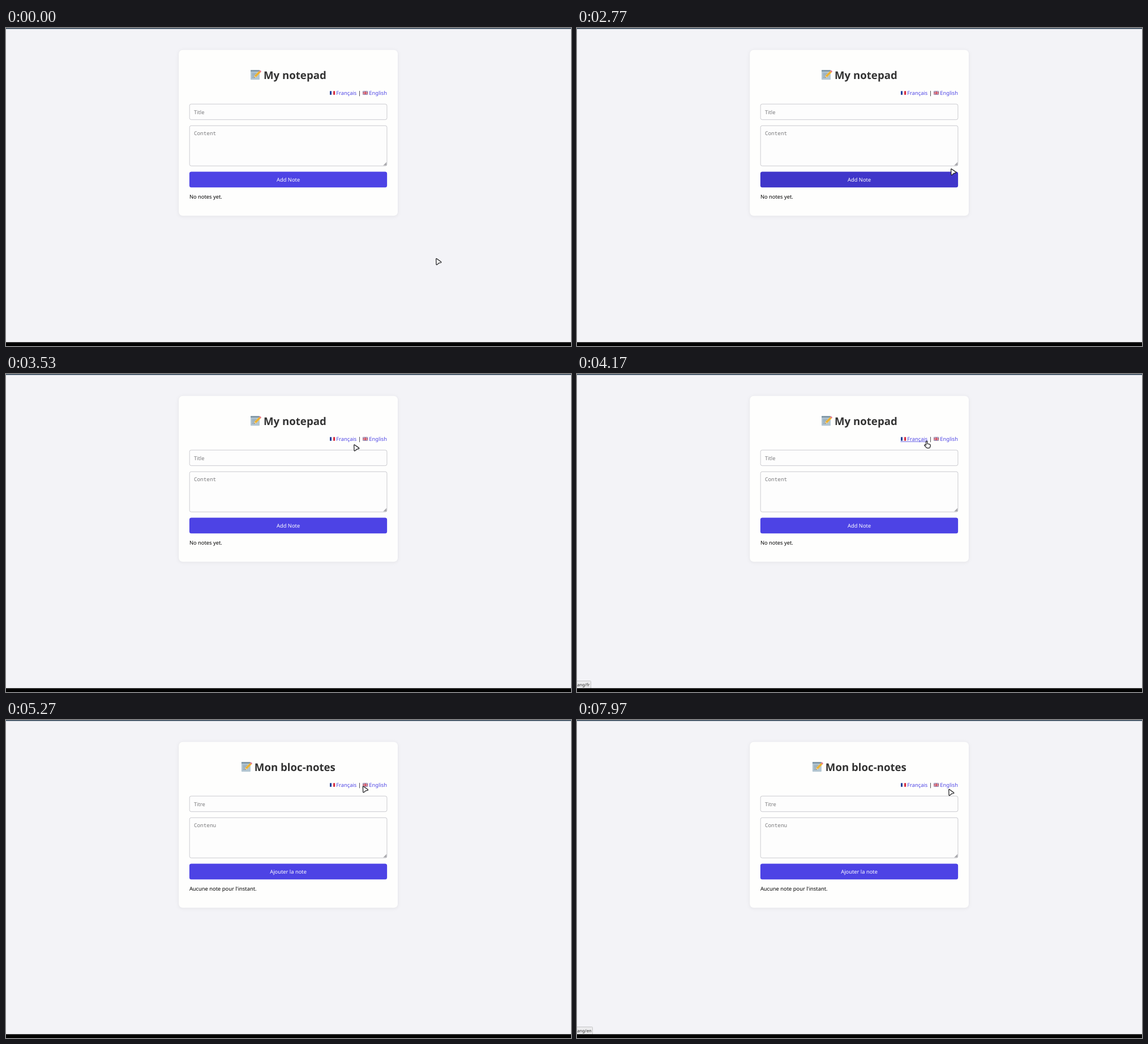
An HTML page for the animation above (8 s loop, 998 by 561 pixels).

```html
<!DOCTYPE html>
<html lang="en">
<head>
<meta charset="utf-8">
<title>Notepad</title>
<style>
  html, body { margin: 0; width: 100%; height: 100%; overflow: hidden; background: #f3f3f7; }
  svg { display: block; width: 998px; height: 561px; }
  text { font: 9.33px "Noto Sans", sans-serif; text-rendering: geometricPrecision; white-space: pre; }
  .title { font-size: 18.66px; font-weight: 700; fill: #333; }
  .hint { fill: #7b7b7d; }
  .mono { font-family: "Noto Sans Mono", monospace; }
  .field { fill: #fdfdfd; stroke: #cbcbd0; }
  .link text { fill: #4f46e5; }
  .link line { stroke: #4f46e5; stroke-width: .8; visibility: hidden; }
  .link.on line { visibility: visible; }
  .status { font-size: 7.62px; fill: #333; }
  .card { filter: drop-shadow(0 1px 3px rgba(0, 0, 0, .07)); }
  .cursor { fill: #fff; stroke: #1c1c1f; stroke-width: 1.25; stroke-linejoin: round; }
</style>
</head>
<body>
<svg viewBox="0 0 998 561">
  <rect width="998" height="561" fill="#f3f3f7"/>
  <rect width="998" height="1.6" fill="#2b4054"/>
  <rect class="card" x="305.3" y="38.8" width="386.7" height="292.4" rx="7" fill="#fefefd"/>

  <g id="memo">
    <rect x=".6" y="1" width="16" height="17.2" rx="1" fill="#b3c6d2"/>
    <rect x=".6" y="1" width="16" height="3" rx="1" fill="#8299a8"/>
    <path d="M3 7h8M3 9.5h6.500M3 12h4.500M3 14.500h3" stroke="#7f96a5" stroke-width=".9"/>
    <path d="M6.600 14.800l1-3.700 8-8.200 2.700 2.600-8 8.300z" fill="#f5bd35"/>
    <path d="M8.800 12.400l8-8.200" stroke="#d9942a" stroke-width=".9"/>
    <path d="M6.600 14.800l1-3.700 2.700 2.700z" fill="#ecd2a6"/>
    <path d="M6.600 14.800l.4-1.500 1.100 1.100z" fill="#3c3c3c"/>
    <path d="M15.600 2.900l1-1q.8-.6 1.600.1l1 1q.6.800 0 1.600l-.9.900z" fill="#e8788c"/>
  </g>
  <text class="title" id="title" y="89.700"></text>

  <g class="link" id="fr">
    <g transform="translate(572 111.300)">
      <rect width="3.200" height="6.500" fill="#21409a"/>
      <rect x="3.100" width="3" height="6.500" fill="#f3f3f3"/>
      <rect x="6.100" width="3.100" height="6.500" fill="#d8283a"/>
    </g>
    <text x="583.200" y="117.900">Français</text>
    <line x1="571.500" x2="619.600" y1="119.400" y2="119.400"/>
  </g>
  <text x="622" y="117.900">|</text>
  <g class="link" id="en">
    <g transform="translate(630 111.300)">
      <rect width="9.200" height="6.500" fill="#2c4a97"/>
      <path d="M0 0l9.200 6.500M9.200 0L0 6.500" stroke="#f3f3f3" stroke-width="1.400"/>
      <path d="M0 0l9.200 6.500M9.200 0L0 6.500" stroke="#d02c40" stroke-width=".5"/>
      <path d="M4.600 0v6.500M0 3.250h9.200" stroke="#f3f3f3" stroke-width="2.300"/>
      <path d="M4.600 0v6.500M0 3.250h9.200" stroke="#d02c40" stroke-width="1.300"/>
    </g>
    <text x="641.300" y="117.900">English</text>
    <line x1="629.500" x2="673" y1="119.400" y2="119.400"/>
  </g>

  <rect class="field" x="324.200" y="134.200" width="348.700" height="27.500" rx="3"/>
  <text class="hint" id="name" x="331.900" y="151.700"></text>
  <rect class="field" x="324.200" y="172.300" width="348.700" height="71" rx="3"/>
  <text class="hint mono" id="body" x="331.900" y="189"></text>
  <path d="M672.200 236.500v6h-6z" fill="#a9a9ad"/>
  <rect id="button" x="323.900" y="253.400" width="349.200" height="27.900" rx="3.500"/>
  <text id="add" x="498.600" y="270.900" text-anchor="middle" fill="#fff"></text>
  <text id="empty" x="323.900" y="300.600"></text>

  <g id="status">
    <path id="panel" fill="#ececee" stroke="#c4c4c6"/>
    <text class="status" id="url" y="550.700"></text>
  </g>
  <rect y="554.300" width="998" height="6.700"/>

  <path class="cursor" id="arrow" d="M.7 1.500Q.8.300 1.800 1L9.400 6.400Q10.300 7.600 9 8L5.600 8.700 2.600 11.400Q1.100 12.200 1 10.600Z"/>
  <path class="cursor" id="hand" d="M3.500 7.500V1.600a1.200 1.200 0 0 1 2.400 0V5L9.800 5.900Q11.400 6.400 11.300 8L10.600 11Q10.300 12.500 9 12.500H5.500Q4.600 12.500 4 11.700L1 8.400Q.3 7.400 1.300 6.900 2.200 6.600 3.500 7.500Z"/>
</svg>
<script>
const LOOP = 8000;
const $ = id => document.getElementById(id);

const words = {
  en: { title: "My notepad", name: "Title", body: "Content", add: "Add Note",
        empty: "No notes yet.", memoX: 431.4 },
  fr: { title: "Mon bloc-notes", name: "Titre", body: "Contenu", add: "Ajouter la note",
        empty: "Aucune note pour l'instant.", memoX: 415.3 }
};

// [ms, x, y] of the pointer's top left corner
const path = [
  [2330, 759, 406], [2430, 760, 411], [2530, 740, 378], [2650, 694, 302],
  [2770, 660, 248], [2950, 642, 199], [3130, 632, 161], [3330, 621, 138],
  [3530, 614, 124], [3700, 613, 120], [3970, 613, 117], [4170, 613, 118],
  [4900, 613, 118], [5100, 616, 117], [5300, 632, 116], [5500, 646, 116],
  [5750, 653, 116], [6000, 655, 117], [7630, 655, 117], [7760, 655, 119],
  [7880, 656, 123.5], [7970, 656, 121.5]
];

// Each table holds [start ms, value]
const pages = [[0, "en"], [4970, "fr"]];
const hovers = [[0, ""], [2670, "button"], [2800, ""], [3730, "fr"], [5200, ""], [5310, "en"], [7800, ""]];
const statuses = [[0, null], [3760, ["ang/fr", 25]], [4630, ["lhost...", 110]], [4970, ["ang/fr", 25]],
  [5230, null], [5450, ["ang/en", 28]]];

const at = (table, t) => table.findLast(row => row[0] <= t)[1];

function pointer(t) {
  const i = path.findIndex(p => p[0] > t);
  if (i === 0) return path[0].slice(1);
  if (i < 0) return path.at(-1).slice(1);
  const a = path[i - 1], b = path[i], k = (t - a[0]) / (b[0] - a[0]);
  return [a[1] + (b[1] - a[1]) * k, a[2] + (b[2] - a[2]) * k];
}

const show = (el, on) => el.setAttribute("visibility", on ? "visible" : "hidden");

function draw(t) {
  const page = words[at(pages, t)];
  for (const id of ["title", "name", "body", "add", "empty"]) {
    if ($(id).textContent !== page[id]) $(id).textContent = page[id];
  }
  $("memo").setAttribute("transform", `translate(${page.memoX} 73)`);
  $("title").setAttribute("x", page.memoX + 23.5);

  const hover = at(hovers, t);
  const overLink = hover === "fr" || hover === "en";
  $("fr").classList.toggle("on", hover === "fr");
  $("en").classList.toggle("on", hover === "en");
  $("button").setAttribute("fill", hover === "button" ? "#4036ca" : "#4d43e5");

  const status = at(statuses, t);
  show($("status"), status);
  if (status) {
    const [label, width] = status;
    $("url").textContent = label;
    $("url").setAttribute("x", label === "lhost..." ? -0.5 : 0.2);
    $("panel").setAttribute("d", `M-2 541.500H${width - 1.5}q1 0 1 1V556H-2z`);
  }

  const [x, y] = pointer(t);
  for (const id of ["arrow", "hand"]) {
    $(id).setAttribute("transform", `translate(${x} ${y})`);
    show($(id), (id === "hand") === overLink);
  }
}

function tick() {
  draw(performance.now() % LOOP);
  requestAnimationFrame(tick);
}
tick();
</script>
</body>
</html>
```
